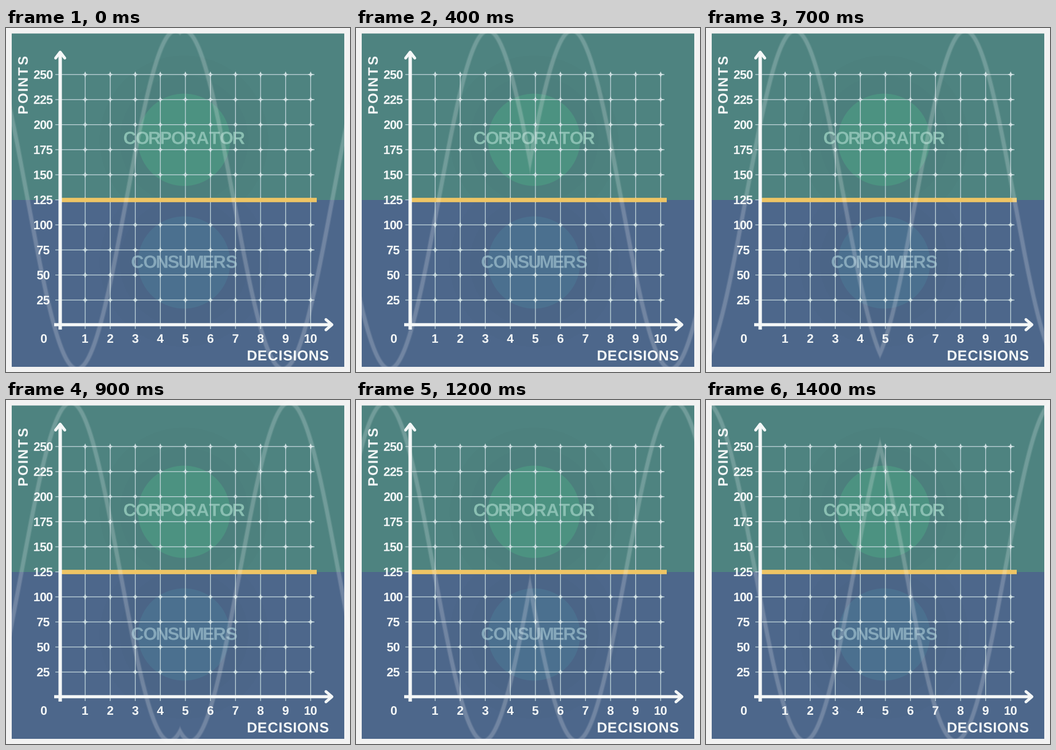
A matplotlib script for the animation above (1.5 s loop, 600 by 600 pixels).

```python
import numpy as np
import matplotlib.pyplot as plt
from matplotlib.animation import FuncAnimation
from matplotlib.patches import Circle, PathPatch, Polygon, Rectangle
from matplotlib.textpath import TextPath
from matplotlib.transforms import Affine2D

plt.rcParams["path.snap"] = False

SIZE, DPI = 600, 100
FRAMES, INTERVAL = 15, 100
PX = 72 / DPI
FONT = {"family": "Liberation Sans", "weight": "bold"}

PAPER, GREEN, BLUE = "#f2f2f2", "#4e8380", "#4d678b"
GREEN_DISC, BLUE_DISC = "#4c9281", "#4b708f"
GREEN_TEXT, BLUE_TEXT = "#8abfb2", "#86a8bb"
INK, GRID, NODE, GOLD = "#f4f7f7", "#c2d6db", "#d3e3e5", "#efc565"

X0, Y0, STEP = 94.4, 518.2, 43.7


def write(text, x, y, size, gap, color=INK, upright=False, z=6):
    """Letter a string centred on (x, y) with an even gap between letters."""
    glyphs = [TextPath((0, 0), char, size=size, prop=FONT) for char in text]
    boxes = [glyph.get_extents() for glyph in glyphs]
    pen = -(sum(b.width for b in boxes) + gap * (len(text) - 1)) / 2
    place = Affine2D().scale(1, -1).rotate_deg(-90 if upright else 0)
    place.translate(x, y)
    for glyph, b in zip(glyphs, boxes):
        shift = Affine2D().translate(pen - b.x0, -.35 * size)
        ax.add_patch(PathPatch(glyph.transformed(shift + place),
                               fc=color, lw=0, zorder=z))
        pen += b.width + gap


def number(value, x, y):
    write(str(value), x, y, 21.5, .7)


def box(x, y, x2, y2, color, z=1):
    ax.add_patch(Rectangle((x, y), x2 - x, y2 - y, fc=color, lw=0, zorder=z))


def line(xs, ys, width, color=INK, z=6, cap="butt"):
    ax.plot(xs, ys, color=color, lw=width * PX, zorder=z,
            solid_capstyle=cap, solid_joinstyle="round")


def star(x, y, r=5.5, inner=2.2):
    a = np.arange(8) * np.pi / 4
    rad = np.where(np.arange(8) % 2, inner, r)
    pts = np.column_stack([x + rad * np.cos(a), y + rad * np.sin(a)])
    ax.add_patch(Polygon(pts, fc=NODE, lw=0, zorder=4))


def zone(top, bottom, color, disc_y, disc, word, word_y, tint):
    """One half of the board: ground, faint halos, disc and its word."""
    box(10, top, 590, bottom, color)
    ground = Rectangle((10, top), 580, bottom - top, transform=ax.transData)
    for r in (147, 112):
        halo = ax.add_patch(Circle((310.5, disc_y), r, fc="black", alpha=.008,
                                   lw=0, zorder=1.5))
        halo.set_clip_path(ground)
    ax.add_patch(Circle((310.5, disc_y), 80.5, fc=disc, lw=0, zorder=2))
    write(word, 311, word_y, 31, 1.1, tint, z=3)


fig = plt.figure(figsize=(SIZE / DPI, SIZE / DPI), dpi=DPI, facecolor=PAPER)
ax = fig.add_axes([0, 0, 1, 1])
ax.set(xlim=(0, SIZE), ylim=(SIZE, 0))
ax.axis("off")

zone(9.6, 300, GREEN, 195, GREEN_DISC, "CORPORATOR", 191.5, GREEN_TEXT)
zone(300, 591, BLUE, 409, BLUE_DISC, "CONSUMERS", 407.5, BLUE_TEXT)

# Grid, ticks and numbers
number(0, 66, 541.5)
for i in range(1, 11):
    gx, gy = X0 + i * STEP, Y0 - i * STEP
    line([gx, gx], [78, 525], 1.3, GRID, 4)
    line([86, 538], [gy, gy], 1.3, GRID, 4)
    for j in range(1, 11):
        star(gx, Y0 - j * STEP)
    number(25 * i, 65, gy)
    number(i, gx, 541.5)

# Axes and the middle line
box(94, 294.5, 542, 305.5, GREEN, 4.5) if False else None
box(94, 296.2, 542, 303.8, GOLD, 5)
line([94.5, 94.5], [526, 43], 6)
line([84, 567], [517.5, 517.5], 5.5)
line([86.5, 94.5, 102.5], [52.5, 42, 52.5], 5, cap="round")
line([558, 568.5, 558], [508.5, 517.5, 526.5], 5, cap="round")
write("DECISIONS", 492, 571, 25, 3.2)
write("POINTS", 29.5, 99.5, 24, 4.6, upright=True)

# Cosine wave flowing outwards, mirrored about the middle
MID, CENTER_Y, AMP, LENGTH = 303.5, 299.5, 295, 344
SPEED, LAG = LENGTH / FRAMES, 1.1
dist = np.linspace(-12, 320, 500)

waves = []
for side in (-1, 1):
    left = 0 if side < 0 else MID
    half = Rectangle((left, 0), MID if side < 0 else SIZE - MID, SIZE,
                     transform=ax.transData)
    for width, alpha in ((9, .09), (6, .13)):
        curve, = ax.plot([], [], color="white", alpha=alpha, lw=width * PX,
                         zorder=8)
        curve.set_clip_path(half)
        waves.append((curve, side))


def travel(n):
    """Soft start into a steady glide with a slight sway."""
    glide = SPEED * (n - LAG * (1 - np.exp(-n / LAG)))
    return 8 + glide + 5 * np.sin(2 * np.pi * (n - 4.6) / 9.5)


def draw(frame):
    y = CENTER_Y - AMP * np.cos(2 * np.pi * (dist - travel(frame)) / LENGTH)
    for curve, side in waves:
        curve.set_data(MID + side * dist, y)
    return [curve for curve, _ in waves]


anim = FuncAnimation(fig, draw, frames=FRAMES, interval=INTERVAL,
                     repeat=True, repeat_delay=0, blit=False)
plt.show()
```
